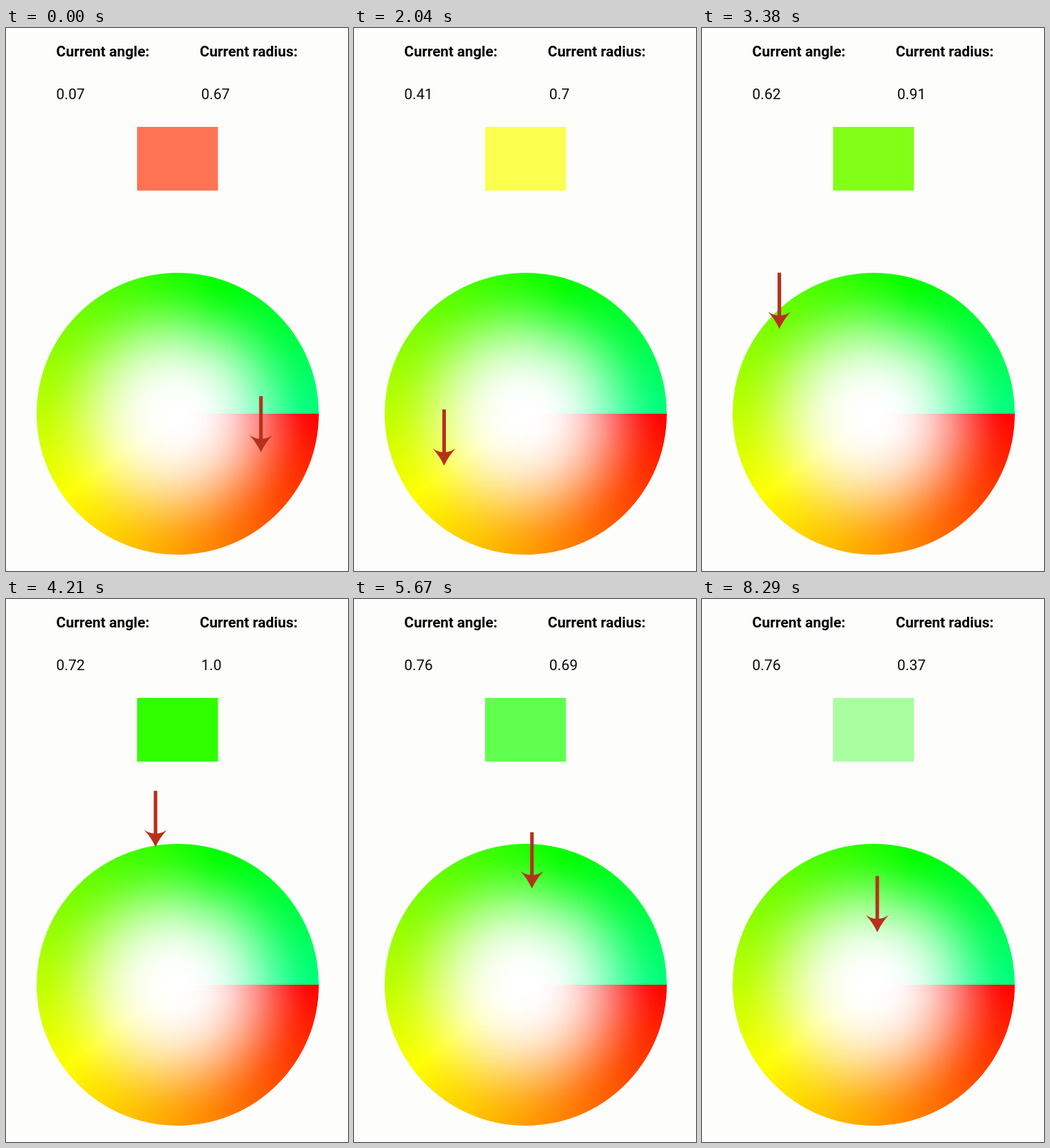
Write an HTML page that moves like this. It is 480x763 px and loops after 8.37 s.

```html
<!DOCTYPE html>
<html lang="en">
<head>
<meta charset="utf-8">
<title>Colour wheel</title>
<style>
  html, body { margin: 0; width: 100%; height: 100%; overflow: hidden; background: #fdfdfb; }
  #stage { position: relative; width: 480px; height: 763px; overflow: hidden; }
  #wheel { position: absolute; left: 42.5px; top: 343.5px; width: 396px; height: 396px; border-radius: 50%; }
  svg { position: absolute; left: 0; top: 0; }
  text { font: 20.5px Roboto, sans-serif; fill: #0a0a0a; }
  .label { font-weight: 700; fill: #000; }
</style>
</head>
<body>
<div id="stage">
  <div id="wheel"></div>
  <svg width="480" height="763" viewBox="0 0 480 763">
    <text class="label" x="70.5" y="40">Current angle:</text>
    <text class="label" x="272" y="40">Current radius:</text>
    <text id="angle" x="70.5" y="100"></text>
    <text id="radius" x="274" y="100"></text>
    <rect id="swatch" x="184" y="139" width="113.5" height="89.5"/>
    <path id="arrow" fill="#b8301a"
      d="M-2.5-79H2.5V-19Q9-19.5 16-24Q6.5-14 0 0Q-6.5-14-16-24Q-9-19.5-2.5-19Z"/>
  </svg>
</div>
<script>
  const LOOP = 8370, STEP = 125 / 3;
  const CENTER = { x: 240.5, y: 541 }, UNIT = 195;
  const HUE_SPAN = 150;

  // drag path: time in ms, angle in turns, radius as a fraction
  const path = [
    [330, 0.07, 0.665],
    [1000, 0.183, 0.64],
    [2040, 0.408, 0.697],
    [3380, 0.617, 0.909],
    [4210, 0.725, 1],
    [5670, 0.761, 0.689],
    [6500, 0.762, 0.374]
  ];
  const last = path.length - 1;
  const $ = id => document.getElementById(id);

  // pure hue for an angle, faded towards white near the centre
  function color(turn, radius) {
    const h = turn * HUE_SPAN / 60;
    const pure = [Math.max(0, Math.min(1, 2 - h)), Math.min(1, h), Math.max(0, h - 2)];
    return `rgb(${pure.map(c => Math.round(255 * (1 - radius * (1 - c))))})`;
  }

  function paintWheel() {
    const steps = 20, veil = [];
    for (let i = 0; i <= steps; i++) {
      const r = i / steps, alpha = (1 + Math.cos(Math.PI * r ** 1.3)) / 2;
      veil.push(`rgba(255,255,255,${alpha.toFixed(3)}) ${r * 100}%`);
    }
    const hues = [0, 0.4, 0.8, 1].map(a => `${color(a, 1)} ${a * 100}%`);
    $('wheel').style.background =
      `radial-gradient(circle closest-side, ${veil}), conic-gradient(from 90deg, ${hues})`;
  }

  function slope(i, col) {
    if (i === 0 || i === last) return 0;
    const a = path[i - 1], b = path[i + 1];
    return (b[col] - a[col]) / (b[0] - a[0]);
  }

  // smooth curve through the path points
  function ease(i, col, t) {
    const a = path[i], b = path[i + 1], span = b[0] - a[0];
    const u = (t - a[0]) / span, v = 1 - u;
    return a[col] * v * v * (1 + 2 * u) + b[col] * u * u * (1 + 2 * v)
      + span * u * v * (slope(i, col) * v - slope(i + 1, col) * u);
  }

  function format(v) {
    const n = Math.round(v * 100) / 100;
    return Number.isInteger(n) ? n.toFixed(1) : String(n);
  }

  function draw(ms) {
    const tick = Math.floor((ms % LOOP + 5) / STEP) * STEP;
    const t = Math.min(Math.max(tick, path[0][0]), path[last][0]);
    let i = 0;
    while (i < last - 1 && t >= path[i + 1][0]) i++;

    const turn = ease(i, 1, t), radius = Math.min(1, ease(i, 2, t));
    const x = CENTER.x + UNIT * radius * Math.cos(turn * 2 * Math.PI);
    const y = CENTER.y + UNIT * radius * Math.sin(turn * 2 * Math.PI);

    $('arrow').setAttribute('transform', `translate(${x.toFixed(2)} ${y.toFixed(2)})`);
    $('swatch').setAttribute('fill', color(turn, radius));
    $('angle').textContent = format(turn);
    $('radius').textContent = format(radius);
  }

  paintWheel();
  const start = performance.now();
  function frame() {
    draw(performance.now() - start);
    requestAnimationFrame(frame);
  }
  frame();
</script>
</body>
</html>
```
